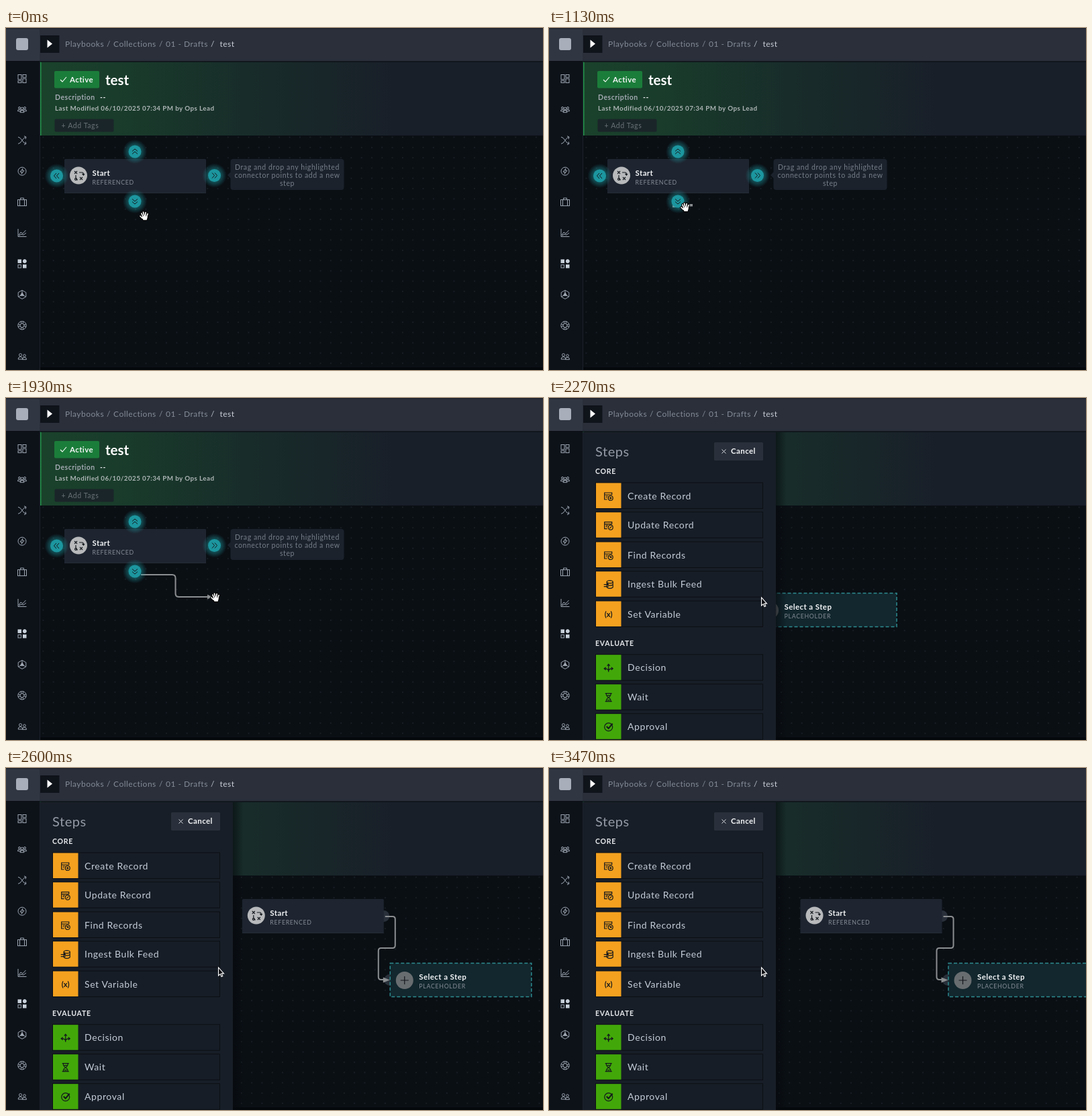
These frames come from a looping animation (800 px wide and 509 px high, 3.54 s). An HTML page:

```html
<!DOCTYPE html>
<html lang="en">
<head>
<meta charset="utf-8">
<title>Playbook designer</title>
<style>
html, body { margin: 0; width: 100%; height: 100%; overflow: hidden; background: #0a0f14; }
svg { display: block; }
text { font-family: Lato, sans-serif; fill: #a3a9b2; white-space: pre; }
.crumb { font-size: 12px; letter-spacing: .5px; fill: #858c97; }
.small { font-size: 10.5px; letter-spacing: .6px; }
.name { font-size: 11.5px; letter-spacing: .4px; font-weight: 700; fill: #f2f4f6; }
.kind { font-size: 8.8px; letter-spacing: .68px; fill: #858c96; }
.head { font-size: 10.5px; letter-spacing: .75px; font-weight: 700; fill: #e6e9ed; }
.item { font-size: 14px; letter-spacing: .6px; fill: #c3ccd8; }
.hint { fill: #767e89; }
.line { fill: none; stroke: #8b8e90; stroke-width: 2; }
.icon { fill: none; stroke: #9ca4af; stroke-width: 1; }
.dark { fill: none; stroke: #14181d; stroke-width: 1.2; }
</style>
</head>
<body>
<svg width="800" height="509" viewBox="0 0 800 509">
  <defs>
    <pattern id="dots" width="15.3" height="15.3" patternUnits="userSpaceOnUse">
      <circle cx="9.500" cy="9.500" r=".8" fill="#20282e"/>
    </pattern>
    <linearGradient id="green">
      <stop offset="0" stop-color="#1a422b"/>
      <stop offset=".18" stop-color="#193b2b"/>
      <stop offset=".4" stop-color="#182d2a"/>
      <stop offset=".58" stop-color="#182529"/>
      <stop offset=".7" stop-color="#191f29"/>
    </linearGradient>
    <linearGradient id="shade">
      <stop offset="0" stop-color="#05080c" stop-opacity=".6"/>
      <stop offset="1" stop-color="#05080c" stop-opacity="0"/>
    </linearGradient>
    <radialGradient id="glow">
      <stop offset=".45" stop-color="#1fa3ac" stop-opacity=".5"/>
      <stop offset="1" stop-color="#1fa3ac" stop-opacity="0"/>
    </radialGradient>
  </defs>

  <rect width="800" height="509" fill="#0a0f14"/>
  <g id="scene">
    <rect x="-400" y="150" width="1300" height="360" fill="url(#dots)"/>
    <g id="placed">
      <circle cx="298" cy="220.500" r="8.500" fill="#29303a"/>
      <circle cx="307" cy="315.500" r="8.500" fill="#29303a"/>
      <rect x="307.500" y="290.500" width="210.500" height="50" fill="#12272e"/>
      <path class="line" d="M300 221H311Q315 221 315 225V264Q315 268 311 268H294Q290 268 290 272V311Q290 315 294 315H300"/>
      <path d="M297 311.500L307 315.500L297 319.500Z" fill="#8b8e90"/>
      <rect x="307.500" y="290.500" width="210.500" height="50" fill="none" stroke="#2c8b8f" stroke-width="1.500" stroke-dasharray="5 3"/>
      <circle cx="329" cy="316" r="13" fill="#686d70"/>
      <path class="dark" d="M323 316h12M329 310v12"/>
      <text class="name" x="350.500" y="315">Select a Step</text>
      <text class="kind" x="350.500" y="328">PLACEHOLDER</text>
    </g>
    <g id="wire">
      <path class="line" id="wirePath"/>
      <path id="wireTip" d="M-5 -3.500L2 0L-5 3.500Z" fill="#8b8e90"/>
    </g>
    <rect x="87" y="195" width="211" height="51" rx="1.500" fill="#1e2530"/>
    <path d="M87 245.500H298" stroke="#242c37"/>
    <circle cx="108" cy="219.500" r="13" fill="#b7b9bb"/>
    <path class="dark" d="M102 213l4 4m0-4l-4 4M110 222l4 4m0-4l-4 4M109 215h4.500q2 0 2 3M113.500 217l2 2 1.500-2M104 219v3q0 4 3 4"/>
    <circle class="dark" cx="104" cy="225" r="1.500"/>
    <text class="name" x="128.500" y="219.500">Start</text>
    <text class="kind" x="128.500" y="232.500">REFERENCED</text>
    <g id="hints">
      <rect x="334.500" y="195" width="169" height="46" rx="4" fill="#1b222c"/>
      <path d="M335 214l-5 5l5 5z" fill="#1b222c"/>
      <g text-anchor="middle">
        <text class="small hint" x="419" y="210.500">Drag and drop any highlighted</text>
        <text class="small hint" x="419" y="222.500">connector points to add a new</text>
        <text class="small hint" x="419" y="235">step</text>
      </g>
      <g id="ports"></g>
    </g>
  </g>
  <rect x="50" y="505" width="750" height="4" fill="#05080b"/>

  <rect x="50" y="50" width="750" height="110" fill="url(#green)"/>
  <rect x="50" y="50" width="2.500" height="110" fill="#219149"/>
  <rect x="72" y="64" width="67" height="25.500" rx="2" fill="#1b7d3a"/>
  <path d="M81 77l3 3l6-7" fill="none" stroke="#fff" stroke-width="1.100"/>
  <text class="name" x="95" y="80.500">Active</text>
  <text x="148" y="84.500" font-size="20.500" font-weight="700" style="fill:#fff">test</text>
  <text x="73" y="107" font-size="10.500" font-weight="700" letter-spacing=".5">Description</text>
  <text class="small" x="140" y="107" font-weight="700" style="fill:#e6e9ed">--</text>
  <text x="73" y="123" font-size="9.800" font-weight="700" letter-spacing=".43" style="fill:#adb5b5">Last Modified 06/10/2025 07:34 PM by Ops Lead</text>
  <rect x="72.500" y="135.500" width="88" height="19" rx="2" fill="#1a2529"/>
  <text class="small" x="82.500" y="149" style="fill:#687277">+ Add Tags</text>

  <g id="panel">
    <rect x="338" y="51" width="16" height="458" fill="url(#shade)"/>
    <rect x="50" y="51" width="288" height="458" fill="#181e27"/>
    <text x="69" y="87" font-size="20" letter-spacing=".58" style="fill:#949ba6">Steps</text>
    <rect x="246" y="66" width="73" height="27" rx="1.500" fill="#2a303b"/>
    <path d="M257.500 76.500l6 6m0-6l-6 6" stroke="#d8dce2"/>
    <text class="name" x="271" y="83">Cancel</text>
    <text class="head" x="69" y="112.500">CORE</text>
    <text class="head" x="69" y="369">EVALUATE</text>
    <g id="items"></g>
  </g>

  <rect y="50" width="50" height="459" fill="#0d1219"/>
  <rect x="50" width="750" height="50" fill="#2a2f3a"/>
  <rect width="50" height="49" fill="#303642"/>
  <rect width="800" height="1.500" fill="#1d222b"/>
  <path d="M0 50H800" stroke="#0d1117" stroke-width="1.500"/>
  <path d="M50.500 51V509" stroke="#1c222b"/>
  <rect x="15" y="15" width="18" height="18" rx="3" fill="#a8afba"/>
  <rect x="51" y="11" width="28.500" height="26" fill="#0f131a"/>
  <path d="M61.500 17.500L69 23.500L61.500 29.500Z" fill="#fff"/>
  <text class="crumb" x="88" y="28">Playbooks</text>
  <text class="crumb" x="150" y="28">/</text>
  <text class="crumb" x="160" y="28">Collections</text>
  <text class="crumb" x="228" y="28">/</text>
  <text class="crumb" x="238" y="28">01 - Drafts</text>
  <text class="crumb" x="305" y="28" style="fill:#b9bfc8">/</text>
  <text class="crumb" x="318.500" y="28" style="fill:#c8cdd5">test</text>
  <g id="sidebar"></g>

  <g id="hand" stroke-linecap="round" stroke-linejoin="round">
    <path id="palm" d="M-4 -4L-2 1M-1.500 -6L0 0M2 -5.500L1.500 0M5 -3.500L3.500 1M-6 0L-3 3M-2.500 1H4L3 5H-1Z" stroke="#000" stroke-width="3.800"/>
    <path d="M-4 -4L-2 1M-1.500 -6L0 0M2 -5.500L1.500 0M5 -3.500L3.500 1M-6 0L-3 3M-2.500 1H4L3 5H-1Z" fill="#fff" stroke="#fff" stroke-width="1.700"/>
  </g>
  <path id="arrow" d="M316.500 297V309L319.200 306.600L321 310.600L322.800 309.800L321.100 305.900H324.500Z" fill="#0a0c0f" stroke="#fff" stroke-width="1.100"/>
</svg>
<script>
const $ = id => document.getElementById(id);

// Connector ports: centre and chevron rotation
$("ports").innerHTML = [[192, 184, 0], [75.5, 220, -90], [310.5, 219.5, 90], [192, 258, 180]].map(([x, y, turn]) =>
  `<g transform="translate(${x} ${y}) rotate(${turn})"><circle r="18" fill="url(#glow)"/><circle r="9.500" fill="#1c969f"/>
   <path class="dark" style="stroke-width:1" d="M-4 -.500L0 -4L4 -.500M-4 3.500L0 0L4 3.500"/></g>`).join("");

const sheet = '<path d="M-2 5H-6V-5H5V-2M-6 -2H5M-4 0H-1M-4 2H-2"/>';
const badge = mark => `${sheet}<circle cx="3" cy="3" r="3.500"/><path d="${mark}"/>`;
const items = [
  [126, "Create Record", badge("M1 3H5M3 1V5")],
  [169.7, "Update Record", badge("M1.500 4.500L4.500 1.500")],
  [214, "Find Records", badge("M4 4L2 2H4V4")],
  [257.7, "Ingest Bulk Feed", '<ellipse cx="2" cy="-4" rx="4.500" ry="2"/><path d="M-2.500 -4V4Q2 7.500 6.500 4V-4M-2.500 0Q2 3 6.500 0M-7 0H0M-7 3H0M-2 -2L0 0"/>'],
  [302, "Set Variable", '<text y="4" text-anchor="middle" font-size="11" font-weight="700" stroke="none" style="fill:#14181d">(x)</text>'],
  [381.7, "Decision", '<path d="M0 6V-5M-2 -3L0 -5.500L2 -3M-6 1Q0 1 0 5Q0 1 6 1M-4 -1L-6.500 1L-4 3M4 -1L6.500 1L4 3"/>'],
  [425.7, "Wait", '<path d="M-5 -6H5M-5 6H5M-3.500 -6Q-3.500 -2 0 0Q3.500 2 3.500 6M3.500 -6Q3.500 -2 0 0Q-3.500 2 -3.500 6M-2 4H2M-2 -3H2"/>'],
  [469.7, "Approval", '<circle r="6"/><path d="M-3 -1L0 2L6 -5" stroke-width="2"/>']
];
$("items").innerHTML = items.map(([y, label, icon], i) =>
  `<rect x="69.500" y="${y}" width="249" height="38.500" fill="#171d26" stroke="#0b0f14"/>
   <rect x="70" y="${y + .5}" width="37.500" height="37.500" fill="${i < 5 ? "#f4a11f" : "#42a809"}"/>
   <g class="dark" transform="translate(88.700 ${y + 20})">${icon}</g>
   <text class="item" x="117" y="${y + 24.5}">${label}</text>`).join("");

const box = (x, y, w, h) => `<rect x="${x}" y="${y}" width="${w}" height="${h}"/>`;
const person = (x, y, r) => `<circle cx="${x}" cy="${y}" r="${r}"/><path d="M${x - r * 1.7} ${y + r * 3.2}q0 ${-r * 1.8} ${r * 1.7} ${-r * 1.8}t${r * 1.7} ${r * 1.8}z"/>`;
const icons = [
  box(-6, -6, 5, 7) + box(1, -6, 5, 4) + box(-6, 3, 5, 3) + box(1, 0, 5, 6),
  person(-4, -2.5, 1.5) + person(4, -2.5, 1.5) + person(0, -1.5, 1.8),
  '<path d="M-6 -5Q-3 -5 0 0T6 5M-6 5Q-3 5 0 0T6 -5M3 -6.500L6 -5L5 -2M3 6.500L6 5L5 2"/>',
  '<circle r="6"/><path d="M1 -4L-3 1H0L-1 4L3 -1H0Z"/>',
  box(-6.5, -3.5, 13, 9) + '<path d="M-2.500 -3.500V-6H2.500V-3.500M-3.500 -3.500V5.500M3.500 -3.500V5.500"/>',
  '<path d="M-6 -6V5.500H6.500M-5 3L-2 -1L1 1L5.500 -4M-5 4L-1 2L2 3L6 0"/>',
  `<g fill="#c8d0da" stroke="#c8d0da">${box(-6, -6, 4.5, 4.5)}<circle cx="3.800" cy="-3.800" r="2.500"/>${box(1.5, 1.5, 4.5, 4.5)}</g>` + box(-6, 1.5, 4.5, 4.5),
  '<path d="M0 -6.500L5.800 -3.200V3.200L0 6.500L-5.800 3.200V-3.200ZM0 -6V-2M-5 3L-2 1M5 3L2 1"/><path d="M0 -3L2.600 1.500H-2.600Z" fill="#a4acb7"/>',
  '<circle r="6.200"/><circle r="3"/><path d="M-2 -6L-1 -3M2 -6L1 -3M-2 6L-1 3M2 6L1 3M-6 -2L-3 -1M-6 2L-3 1M6 -2L3 -1M6 2L3 1"/>',
  person(-2.5, -2, 2) + person(3.5, -1, 1.8)
];
$("sidebar").innerHTML = icons.map((icon, i) =>
  `<g class="icon" transform="translate(24 ${75.5 + i * 45.9})">${icon}</g>`).join("");

const LOOP = 3540, DRAG = 1100, DROP = 2200, PAN = 2270;
const handPath = [[0, 206, 280], [600, 199, 263], [1130, 203, 267], [1930, 312, 297], [LOOP, 312, 297]];
const ease = u => { u = Math.min(1, Math.max(0, u)); return u * u * (3 - 2 * u); };
const show = (id, on) => $(id).setAttribute("display", on ? "inline" : "none");
const move = (id, x, y) => $(id).setAttribute("transform", `translate(${x} ${y})`);

function handAt(t) {
  const i = handPath.findIndex(p => p[0] > t);
  const [t0, x0, y0] = handPath[i - 1], [t1, x1, y1] = handPath[i];
  const u = ease((t - t0) / (t1 - t0));
  return [x0 + (x1 - x0) * u, y0 + (y1 - y0) * u];
}

// Orthogonal wire with rounded bends; it doubles back while the drag is short
function wire(x, y) {
  const sx = 201, sy = 263, dx = x - sx, dy = y - sy;
  if (dx < 14) return `M${sx} ${sy}H213V${sy + dy / 2}H185V${y}H${x}`;
  const mid = sx + dx / 2, r = Math.min(5, Math.abs(dy) / 2, dx / 2), ry = r * Math.sign(dy);
  return `M${sx} ${sy}H${mid - r}Q${mid} ${sy} ${mid} ${sy + ry}V${y - ry}Q${mid} ${y} ${mid + r} ${y}H${x}`;
}

function draw(now) {
  const t = now % LOOP, dropped = t >= DROP;
  const [x, y] = handAt(t);
  show("placed", dropped);
  show("panel", dropped);
  show("arrow", dropped);
  show("hints", !dropped);
  show("hand", !dropped);
  show("wire", t >= DRAG && !dropped);
  move("hand", x, y);
  move("scene", 287.5 * ease((t - PAN) / 400), 0);
  $("wirePath").setAttribute("d", wire(x - 8, y - 1));
  show("wireTip", x > 222);
  move("wireTip", x - 7, y - 1);
  requestAnimationFrame(() => draw(performance.now()));
}
draw(performance.now());
</script>
</body>
</html>
```
